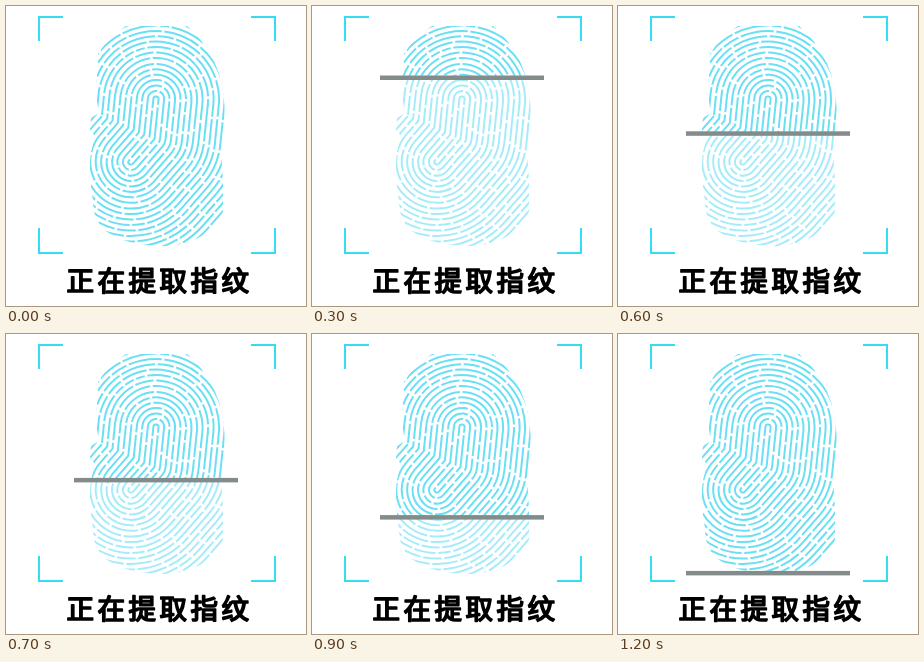
Write an HTML page that moves like this. It is 300 by 300 pixels and loops after 1.3 s.

```html
<!DOCTYPE html>
<html lang="zh">
<head>
<meta charset="utf-8">
<style>
html, body { margin: 0; width: 100%; height: 100%; overflow: hidden; background: #fff; }
svg { display: block; width: 100vw; height: 100vh; }
text { font: 400 27.5px "Noto Sans CJK SC", "Noto Sans CJK", sans-serif; letter-spacing: 3.5px;
  stroke: #000; stroke-width: 1.7; stroke-linejoin: round; }
</style>
</head>
<body>
<svg viewBox="0 0 300 300">
  <clipPath id="finger">
    <path d="M120 20H181Q204 40 213 68Q221 95 218 128Q214 150 217 172V205Q214 220 192 232Q174 240 158 240Q120 240 100 225Q87 215 87 195Q82 165 85 146L89 130 84 124 85 112 93 107 90 90 92 48Q101 32 120 20Z"/>
  </clipPath>
  <g id="ridges" clip-path="url(#finger)" fill="none" stroke="#6bdff3" stroke-width="2" stroke-linejoin="round"/>
  <rect id="veil" x="80" width="142" height="245" fill="#fff" opacity=".4"/>
  <path d="M33 35V11H57M245 11H269V35M33 222V247H57M245 247H269V222" fill="none" stroke="#36dcf6" stroke-width="2"/>
  <text x="60.5" y="285">正在提取指纹</text>
  <rect id="bar" x="68" width="164" height="4.5" fill="#838c8a"/>
</svg>
<script>
const ridges = document.getElementById('ridges');
const bar = document.getElementById('bar');
const veil = document.getElementById('veil');

let seed = 11;
const random = () => (seed = seed * 16807 % 2147483647) / 2147483647;

// Ridges are offset curves around a bent spine: upper core, bend, lower core.
const head = [150, 93], bend = [146, 132], tail = [125, 156];
const normal = (p, q) => {
  const dx = q[0] - p[0], dy = q[1] - p[1], len = Math.hypot(dx, dy);
  return [-dy / len, dx / len];
};
const upper = normal(head, bend), lower = normal(bend, tail);
const dot = upper[0] * lower[0] + upper[1] * lower[1];
const inner = [0, 1].map(i => (upper[i] + lower[i]) / (1 + dot));
const at = (p, n, d) => p.map((v, i) => (v + n[i] * d).toFixed(2)).join(' ');

function ridge(d) {
  const arc = `A${d} ${d} 0 0 0 `;
  const path = document.createElementNS('http://www.w3.org/2000/svg', 'path');
  path.setAttribute('d',
    `M${at(bend, inner, d)}L${at(tail, lower, d)}` +
    `${arc}${at(tail, lower, -d)}L${at(bend, lower, -d)}` +
    `${arc}${at(bend, upper, -d)}L${at(head, upper, -d)}` +
    `${arc}${at(head, upper, d)}Z`);
  const dashes = [];
  for (let i = 0; i < 12; i++) dashes.push((9 + 34 * random()).toFixed(1), 2.6);
  path.setAttribute('stroke-dasharray', dashes.join(' '));
  path.setAttribute('stroke-dashoffset', (60 * random()).toFixed(1));
  ridges.append(path);
}
for (let d = 2.6; d < 108; d += 5.5) ridge(d);

// The bar steps down every 100 ms; ridges below it are pale until scanned.
const start = performance.now();
function draw() {
  const step = Math.floor((performance.now() - start) % 1300 / 100);
  const y = 13.7 + 18.6 * step;
  for (const part of [bar, veil]) {
    part.setAttribute('visibility', step ? 'visible' : 'hidden');
    part.setAttribute('y', y);
  }
  veil.setAttribute('height', Math.max(0, 245 - y));
  requestAnimationFrame(draw);
}
draw();
</script>
</body>
</html>
```
